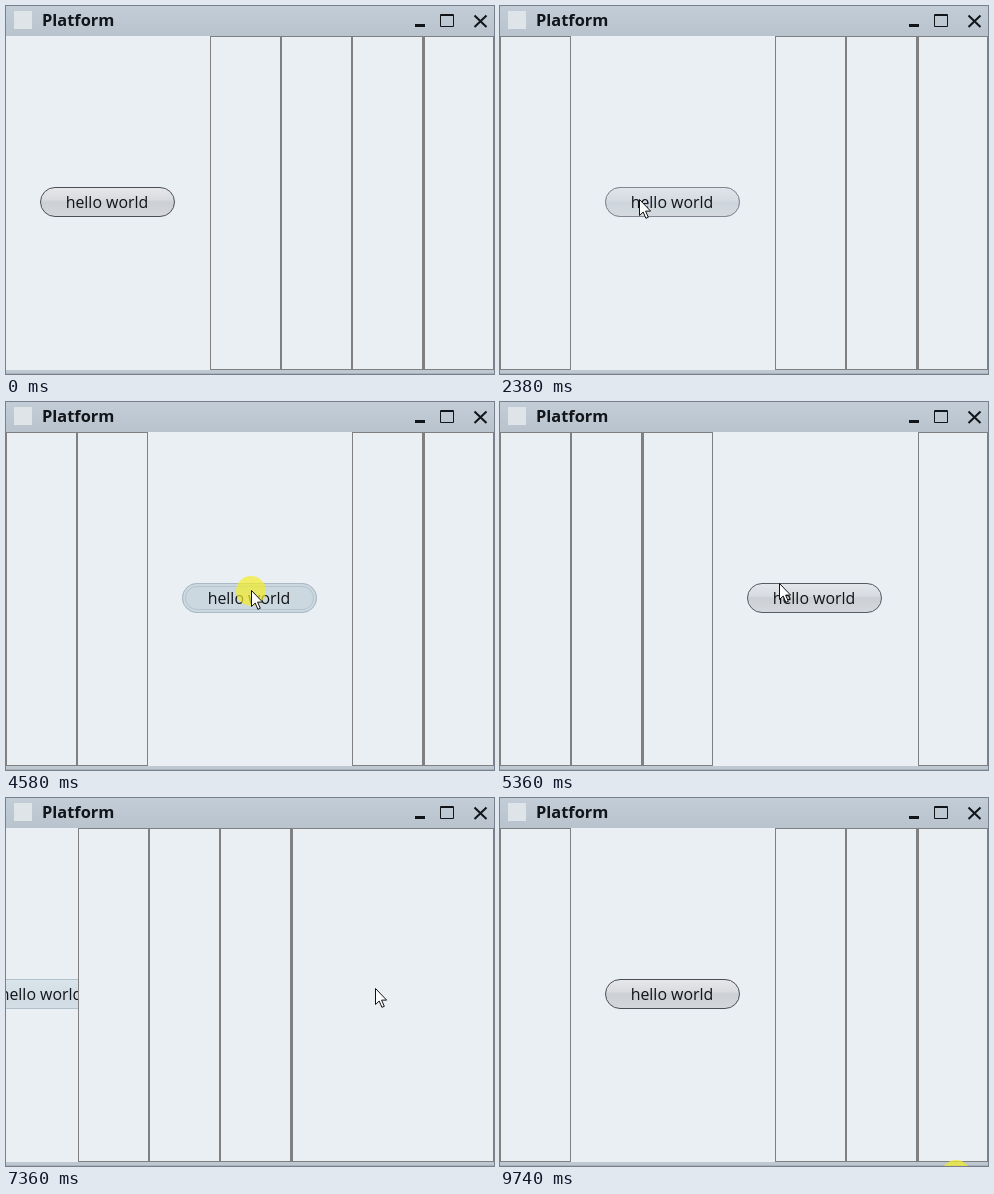
An HTML page for the animation above (9840 ms loop, 488 by 368 pixels).

```html
<!DOCTYPE html>
<html lang="en">
<head>
<meta charset="utf-8">
<title>Platform</title>
<style>
  html, body { margin: 0; width: 100%; height: 100%; overflow: hidden; }
  body { font-family: "Open Sans", "Noto Sans", sans-serif; color: #111418; }
  div, svg { position: absolute; box-sizing: border-box; }
  #stage { left: 0; top: 0; width: 488px; height: 368px; overflow: hidden; background: #eaeff3; }
  #bar { left: 0; top: 0; width: 488px; height: 30px; background: linear-gradient(#c3cdd7, #b9c3cd); }
  #icon { left: 8px; top: 5px; width: 18px; height: 18px; background: #dfe4e8; }
  #name { left: 36px; top: 3px; font: bold 16.4px/22px "Open Sans", "Noto Sans", sans-serif; }
  #tools { left: 0; top: 0; }
  #foot { left: 0; top: 364px; width: 488px; height: 4px; background: #bec8d2; border-bottom: 1px solid #a9b1b9; }
  .cell { top: 30px; height: 334px; border: 1px solid #808080; background: #eaeff3; box-shadow: 1px 0 #808080; }
  #pane { top: 30px; height: 334px; overflow: hidden; background: #eaeff3; }
  #button { top: 151px; width: 135px; height: 30px; }
  .face { inset: 0; border-radius: 15px; border: 1px solid; }
  #plain { border-color: #4b4f55; background: linear-gradient(#e5e7eb 0%, #d9dbdf 42%, #cccfd4 50%, #d4d6da 100%); }
  #hover { border-color: #b1c0ca; background: linear-gradient(#d9e4eb 0%, #d2dee6 45%, #cfdbe4 55%, #d3dee6 100%); }
  #press { border-color: #a9bac5; background: #cbd8e0; }
  #press div { inset: 2px; border-radius: 12px; border: 1px solid #b4c4ce; }
  #label { left: -.5px; width: 100%; top: 4px; text-align: center; white-space: nowrap; font-size: 15.9px; line-height: 22px; }
  #spot { width: 30px; height: 30px; border-radius: 50%; background: rgba(244, 236, 40, .7); }
  #cursor { left: -1px; top: 0; overflow: visible; }
</style>
</head>
<body>
<div id="stage">
  <div id="bar">
    <div id="icon"></div>
    <div id="name">Platform</div>
    <svg id="tools" width="488" height="30">
      <path d="M409 18h10v3h-10z" fill="#111418"/>
      <path d="M434.5 8.5h13v12h-13zM434 9.5h14" fill="none" stroke="#111418"/>
      <path d="M468.5 9.5l12 11.5M480.5 9.5l-12 11.5" stroke="#111418" stroke-width="2"/>
    </svg>
  </div>
  <div id="pane">
    <div id="button">
      <div class="face" id="plain"></div>
      <div class="face" id="hover"></div>
      <div class="face" id="press"><div></div></div>
      <div id="label">hello world</div>
    </div>
  </div>
  <div id="foot"></div>
  <div id="spot"></div>
  <svg id="cursor" width="14" height="22">
    <path d="M.5 .5V16.5L4.2 13L6.9 19.3L9.3 18.3L6.6 12.1H11.6Z" fill="#fff" stroke="#111"/>
  </svg>
</div>
<script>
const LOOP = 9840, LAST_CLICK = 9740;
const COUNT = 5, SMALL = 71.25, LARGE = 203.8;
const PRESS = 90, SLIDE = 210, FADE = 170;

// each click on the button opens the next column
const clicks = [1750, 3300, 4580, 5880, 7270, 8360];

// pointer moves: start, end, x, y, vertical bend
const moves = [
  [340, 740, 101, 181, 0],
  [870, 1000, 101, 194, 0],
  [2300, 2720, 231, 172, 10],
  [2720, 3100, 207, 184, 0],
  [3710, 4010, 246, 188, 0],
  [5060, 5420, 281, 184, -6],
  [6290, 6700, 370, 190, -6],
  [7830, 8300, 152, 201, 0],
  [8910, 9370, 412, 372, 0]
];

const $ = id => document.getElementById(id);
const clamp = v => Math.max(0, Math.min(1, v));
const mix = (a, b, p) => a + (b - a) * p;

const cells = Array.from({ length: COUNT }, () => {
  const el = document.createElement("div");
  el.className = "cell";
  $("stage").insertBefore(el, $("pane"));
  return el;
});

function pointer(t) {
  let x = 268, y = 372, moved = 0;
  for (const [start, end, tx, ty, bend] of moves) {
    if (t < start) break;
    const p = clamp((t - start) / (end - start));
    const ease = Math.sin(p * Math.PI / 2);
    x = mix(x, tx, ease);
    y = mix(y, ty, ease) + bend * Math.sin(p * Math.PI);
    moved = start;
  }
  return { x: Math.round(x), y: Math.round(y), moved };
}

function columns(t) {
  const done = clicks.filter(c => t >= c + PRESS);
  const slid = done.length ? done[done.length - 1] + PRESS : -SLIDE;
  const open = done.length % COUNT, from = (open + COUNT - 1) % COUNT;
  const p = clamp((t - slid) / SLIDE);
  const widths = cells.map((_, i) =>
    i === open ? mix(SMALL, LARGE, p) : i === from ? mix(LARGE, SMALL, p) : SMALL);
  const left = widths.slice(0, open).reduce((a, b) => a + b, 0);
  return { open, slid, widths, left: Math.floor(left) };
}

// a freshly opened button reacts only once the pointer moves again
function isOver(t) {
  const { x, y, moved } = pointer(t), { slid, left } = columns(t);
  return moved > slid && x >= left + 34 && x < left + 169 && y >= 181 && y < 211;
}

function hoverLevel(t) {
  const n = 17;
  let hits = 0;
  for (let i = 0; i < n; i++) hits += isOver(t - i * FADE / n);
  return hits / n;
}

function drawColumns(t) {
  const { open, widths, left } = columns(t);
  let x = 0;
  cells.forEach((cell, i) => {
    const start = Math.round(x);
    x += widths[i];
    cell.style.display = i === open ? "none" : "block";
    cell.style.left = start + "px";
    cell.style.width = Math.floor(x) - start + "px";
  });
  const width = Math.round(widths[open]);
  $("pane").style.left = left + "px";
  $("pane").style.width = width + "px";
  $("button").style.left = Math.floor((width - 135) / 2) + "px";
}

function draw(t) {
  drawColumns(t);
  const { x, y } = pointer(t), level = hoverLevel(t);
  const pressed = clicks.some(c => t >= c && t < c + PRESS);
  const outside = t >= LAST_CLICK;
  const [sx, sy] = outside ? [456, 377] : [x - 1, y + 1];
  $("hover").style.opacity = level;
  $("plain").style.opacity = 1 - level ** 4;
  $("press").style.display = pressed ? "block" : "none";
  $("cursor").style.transform = `translate(${x}px, ${y}px)`;
  $("spot").style.display = pressed || outside ? "block" : "none";
  $("spot").style.transform = `translate(${sx - 15}px, ${sy - 15}px)`;
}

const begin = performance.now();
function tick() {
  draw((performance.now() - begin) % LOOP);
  requestAnimationFrame(tick);
}
tick();
</script>
</body>
</html>
```
